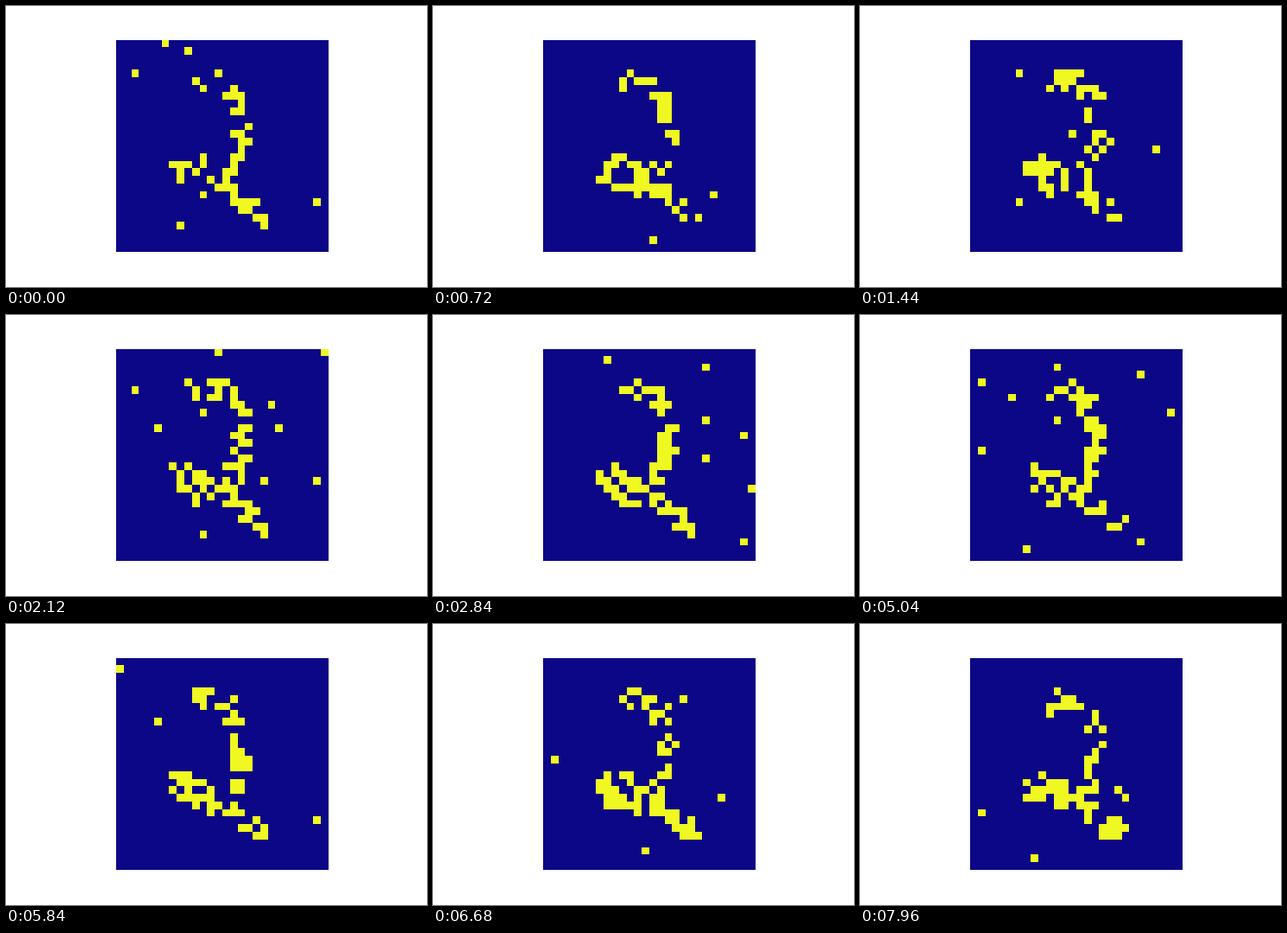
A matplotlib script that plays this animation: 432 by 288 pixels, repeating every 8 s.

```python
import numpy as np
import matplotlib.pyplot as plt
from matplotlib.animation import FuncAnimation

SIZE, FRAMES, INTERVAL = 28, 200, 40
PEAK, NOISE, REACH = 0.57, 0.009, 1.35


def bezier(a, b, c, d):
    """Points along a cubic curve, in (column, row) cells."""
    t = np.linspace(0, 1, 60)[:, None]
    s = 1 - t
    a, b, c, d = map(np.array, (a, b, c, d))
    return a * s**3 + 3 * b * s**2 * t + 3 * c * s * t**2 + d * t**3


def firing_rates():
    """Chance of a spike per cell: high on a handwritten "2", low elsewhere."""
    waist, knot = (15.2, 16), (7.8, 17)
    stroke = np.vstack([
        bezier((10.7, 5), (15, 4), (17.5, 9), waist),
        bezier(waist, (13.5, 20), (9, 20), knot),
        bezier(knot, (8, 13.5), (12.5, 18), (18.6, 22.5)),
    ])
    rows, cols = np.mgrid[:SIZE, :SIZE]
    dist = np.hypot(cols[..., None] - stroke[:, 0],
                    rows[..., None] - stroke[:, 1]).min(axis=-1)
    return np.maximum(NOISE, PEAK * np.exp(-(dist / REACH) ** 4))


rng = np.random.default_rng(7)
spikes = (rng.random((FRAMES, SIZE, SIZE)) < firing_rates()).astype(float)

fig, ax = plt.subplots(figsize=(6, 4), dpi=72, facecolor="white")
fig.subplots_adjust(left=0.125, right=0.9, bottom=0.125, top=0.88)
ax.axis("off")
image = ax.imshow(spikes[0], cmap="plasma", vmin=0, vmax=1,
                  interpolation="nearest")


def update(i):
    image.set_data(spikes[i])
    return [image]


anim = FuncAnimation(fig, update, frames=FRAMES, interval=INTERVAL,
                     repeat=True, repeat_delay=0)
plt.show()
```
